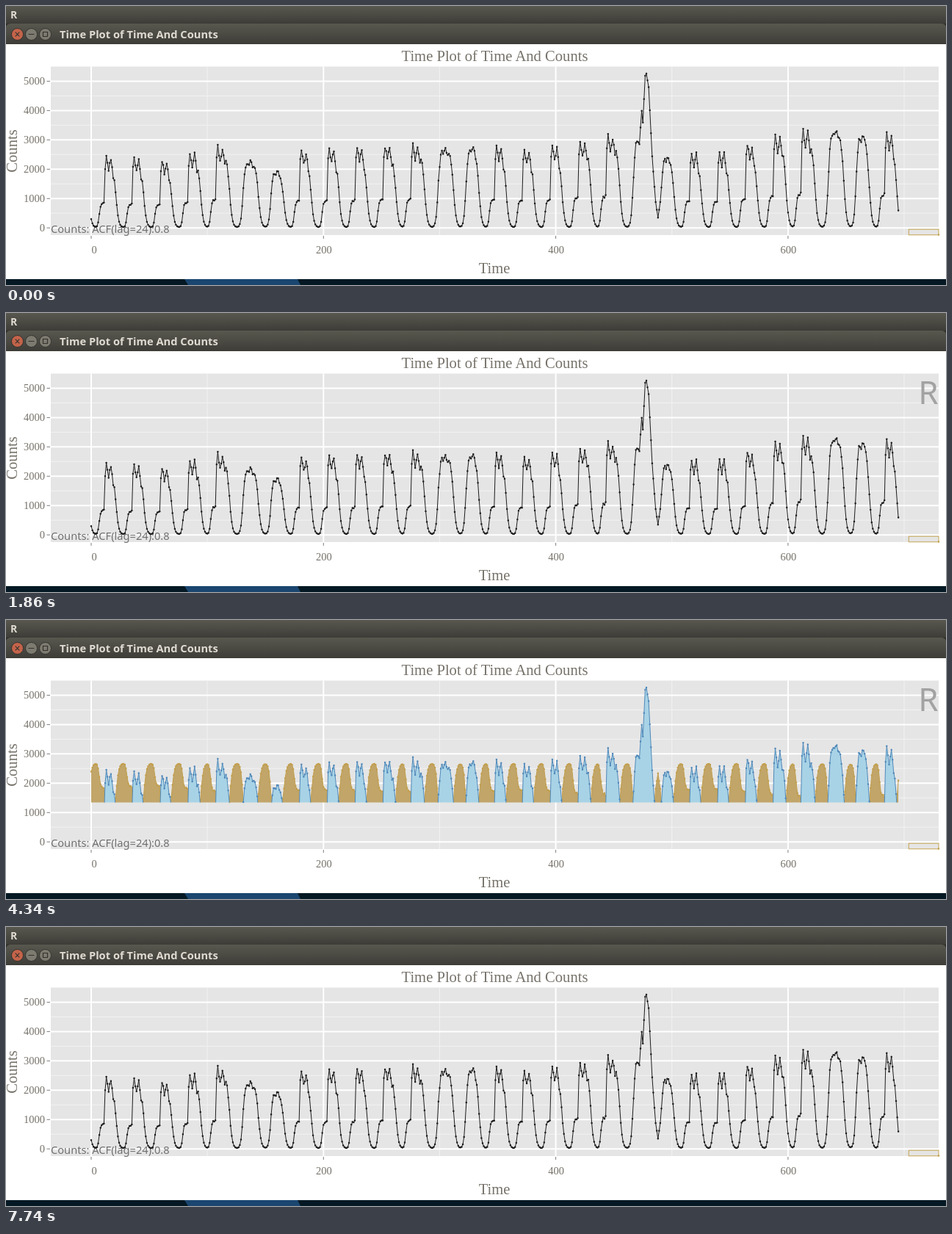
Animation, 1280 px wide and 380 px high, one loop 7950 ms. Source, as an HTML page:

```html
<!DOCTYPE html>
<html lang="en">
<head>
<meta charset="utf-8">
<title>Time Plot of Time And Counts</title>
<style>
  html, body { margin: 0; width: 100%; height: 100%; overflow: hidden; background: #fff; }
  svg { display: block; }
  .serif { font-family: "Liberation Serif", serif; fill: #77736b; }
  .sans { font-family: "Noto Sans", sans-serif; }
  .chrome { font-weight: bold; fill: #dfdbd2; }
  .title { font-size: 20.6px; text-anchor: middle; }
  .tick { font-size: 14.5px; }
  .line { fill: none; stroke-width: 1; stroke-linejoin: round; }
  .dots { fill: none; stroke-width: 2.5; stroke-linecap: round; }
</style>
</head>
<body>
<svg width="1280" height="380" viewBox="0 0 1280 380">
  <defs>
    <linearGradient id="bar" x2="0" y2="1">
      <stop offset="0" stop-color="#59584f"/><stop offset="1" stop-color="#3d3c37"/>
    </linearGradient>
  </defs>
  <rect width="1280" height="380" fill="#fff"/>
  <rect width="1280" height="24" fill="url(#bar)"/>
  <rect y="24" width="1280" height="10" fill="#2b2a27"/>
  <path d="M0 52V30Q0 24 6 24H1274Q1280 24 1280 30V52Z" fill="url(#bar)"/>
  <g stroke="#33322e">
    <circle cx="15.5" cy="38.5" r="8" fill="#c4644a"/>
    <circle cx="34.5" cy="38.5" r="8" fill="#7d7b70"/>
    <circle cx="53.5" cy="38.5" r="8" fill="#7d7b70"/>
    <path d="M12.7 35.7l5.6 5.6m0-5.6l-5.6 5.6M30.5 38.5h8M50.5 35.5h6v6h-6z" fill="none" stroke-width="1.2"/>
  </g>
  <text class="sans chrome" x="6" y="17" font-size="14">R</text>
  <text class="sans chrome" x="73" y="44" font-size="14.7">Time Plot of Time And Counts</text>
  <rect y="372" width="1280" height="8" fill="#041923"/>
  <path d="M243 372H397L401 380H248Z" fill="#1b4670"/>

  <text class="serif title" x="665.5" y="75">Time Plot of Time And Counts</text>
  <text class="serif title" x="665" y="364">Time</text>
  <text class="serif title" transform="translate(14.5 197.5) rotate(-90)">Counts</text>
  <rect x="61" y="82.5" width="1209" height="229.5" fill="#e5e5e5"/>
  <g id="axes"></g>
  <text class="sans" x="61" y="309" font-size="14.65" fill="#6f6f6f">Counts: ACF(lag=24):0.8</text>
  <rect x="1229.3" y="304.2" width="40.7" height="7.6" fill="none" stroke="#c5a555"/>
  <circle cx="1270" cy="311.5" r="1.2" fill="#c19f4c"/>
  <g id="plain"></g>
  <g id="folded"></g>
  <text id="keys" class="sans" x="1269.5" y="124" font-size="44" fill="#a2a2a2" text-anchor="end"></text>
</svg>
<script>
const $ = id => document.getElementById(id);
const X = hour => 116 + hour * 1.5815;
const Y = count => 302.2 - count * 0.03995;
const CUT = 1345;   // counts below this are folded upwards
const HOURS = 29 * 24;

// Axes: a minor line halfway between each pair of major ones
let axes = '';
const rule = (d, major) =>
  axes += `<path d="${d}" stroke="${major ? '#fff' : '#f2f2f2'}" stroke-width="${major ? 2 : 1}"/>`;
for (const major of [false, true]) {
  for (let v = major ? 0 : 500; v <= 5000; v += 1000) rule(`M61 ${Y(v)}H1270`, major);
  for (let h = major ? 0 : 100; h <= 700; h += 200) rule(`M${X(h)} 82.5V312`, major);
}
for (let v = 0; v <= 5000; v += 1000)
  axes += `<path d="M55.5 ${Y(v)}H60" stroke="#7f7f7f"/>
    <text class="serif tick" x="53" y="${Y(v) + 5}" text-anchor="end">${v}</text>`;
for (let h = 0; h <= 600; h += 200)
  axes += `<path d="M${X(h)} 313V317" stroke="#7f7f7f"/>
    <text class="serif tick" x="${X(h) + (h ? 0.5 : 4)}" y="337" text-anchor="middle">${h}</text>`;
$('axes').innerHTML = axes;

// Linear interpolation through [position, value] points
function along(points, t) {
  const n = points.findIndex(p => p[0] >= t);
  if (n <= 0) return points[0][1];
  const [t0, v0] = points[n - 1], [t1, v1] = points[n];
  return v0 + (v1 - v0) * (t - t0) / (t1 - t0);
}
const sigmoid = x => 1 / (1 + Math.exp(-x));
const noise = n => { const s = Math.sin(n * 12.9898) * 43758.5453; return (s - Math.floor(s)) * 2 - 1; };

const dayLevel = [[0, 2120], [2, 2050], [4, 2450], [6, 1850], [7, 2350], [13, 2600],
  [15, 2350], [19, 2900], [20, 2280], [22, 2320], [26, 3180], [28, 2900]];
const surge = [[472, 2850], [474, 3990], [475, 3590], [477, 5190], [478, 5260],
  [480, 4800], [483, 2440], [486, 880], [488, 350], [490, 880]];

// One day's activity: a morning rise (in two steps on workdays), a busy noon
// and late afternoon, and an evening fall that comes later towards Saturday
function activity(day, hour) {
  const weekday = (day + 7) % 7, rest = weekday > 4;
  const lag = weekday < 6 ? Math.max(0, weekday - 2) * 0.9 : 0.5;
  const rise = rest ? sigmoid((hour - 10.6) / 0.9)
    : 0.38 * sigmoid((hour - 6.8) / 0.6) + 0.62 * sigmoid((hour - 11.6) / 0.15);
  const fall = sigmoid((21.3 + lag - hour) / 1.2);
  const busy = Math.abs(hour - 16) < 4
    ? 0.02 + (rest ? 0.03 : 0.1) * Math.cos((hour - 13) * Math.PI / 2) : 0;
  return along(dayLevel, day) * rise * fall * (1 + busy + 0.035 * noise(day * 24 + hour));
}
function countAt(t) {
  if (t >= surge[0][0] && t <= surge[surge.length - 1][0]) return along(surge, t);
  const day = Math.floor(t / 24), hour = t % 24;
  return 15 + activity(day, hour) + activity(day - 1, hour + 24);
}
const series = Array.from({ length: HOURS }, (_, h) => [h, countAt(h)]);

const at = ([h, v]) => `${X(h).toFixed(1)} ${Y(v).toFixed(1)}`;
const trace = pts => 'M' + pts.map(at).join('L');
const area = (pts, base) =>
  trace([[pts[0][0], base], ...pts, [pts[pts.length - 1][0], base]]) + 'Z';
const dots = pts => pts.map(p => `M${at(p)}h.01`).join('');
const layer = (fill, stroke, areaPath, linePath, dotPath) =>
  `<path class="area" d="${areaPath}" fill="${fill}"/>
   <path class="line" d="${linePath}" stroke="${stroke}"/>
   <path class="dots" d="${dotPath}" stroke="${stroke}"/>`;

$('plain').innerHTML = layer('rgba(28,28,28,.49)', '#1c1c1c',
  area(series, 0), trace(series), dots(series));

// Split the series where it crosses the cut; lower runs are reflected
const fold = ([h, v]) => [h, CUT + Math.abs(v - CUT)];
const isHigh = p => p[1] > CUT;
const runs = [];
series.forEach((p, i) => {
  const prev = series[i - 1];
  if (!prev || isHigh(p) !== isHigh(prev)) {
    const run = { high: isHigh(p), pts: [] };
    if (prev) {
      const cross = [prev[0] + (CUT - prev[1]) / (p[1] - prev[1]), CUT];
      runs[runs.length - 1].pts.push(cross);
      run.pts.push(cross);
    }
    runs.push(run);
  }
  runs[runs.length - 1].pts.push(fold(p));
});
const foldedLayer = (high, fill, stroke) => {
  const own = runs.filter(r => r.high === high).map(r => r.pts);
  return layer(fill, stroke, own.map(r => area(r, CUT)).join(''), own.map(trace).join(''),
    dots(series.filter(p => isHigh(p) === high).map(fold)));
};
$('folded').innerHTML = foldedLayer(false, '#c1a569', '#c29f4e') + foldedLayer(true, '#a8d3e6', '#5089ba');

// start time, folded, filled, keys shown
const steps = [
  [0, 0, 0, ''], [990, 0, 1, 'R'], [1820, 0, 1, ''], [1860, 0, 0, 'R'],
  [2890, 1, 0, 'R+F'], [3750, 1, 0, ''], [4340, 1, 1, 'R'], [5740, 1, 0, 'R'],
  [5780, 1, 0, ''], [6250, 0, 0, 'F'], [7740, 0, 0, '']];
const LOOP = 7950;
const areas = document.querySelectorAll('.area');
let shown;

function show(time) {
  const step = steps.filter(s => s[0] <= time).pop();
  if (step === shown) return;
  shown = step;
  const [, folded, filled, keys] = step;
  $('plain').style.display = folded ? 'none' : '';
  $('folded').style.display = folded ? '' : 'none';
  areas.forEach(a => a.style.display = filled ? '' : 'none');
  $('keys').textContent = keys;
}

const start = performance.now();
function tick() {
  show((performance.now() - start) % LOOP);
  requestAnimationFrame(tick);
}
tick();
</script>
</body>
</html>
```
